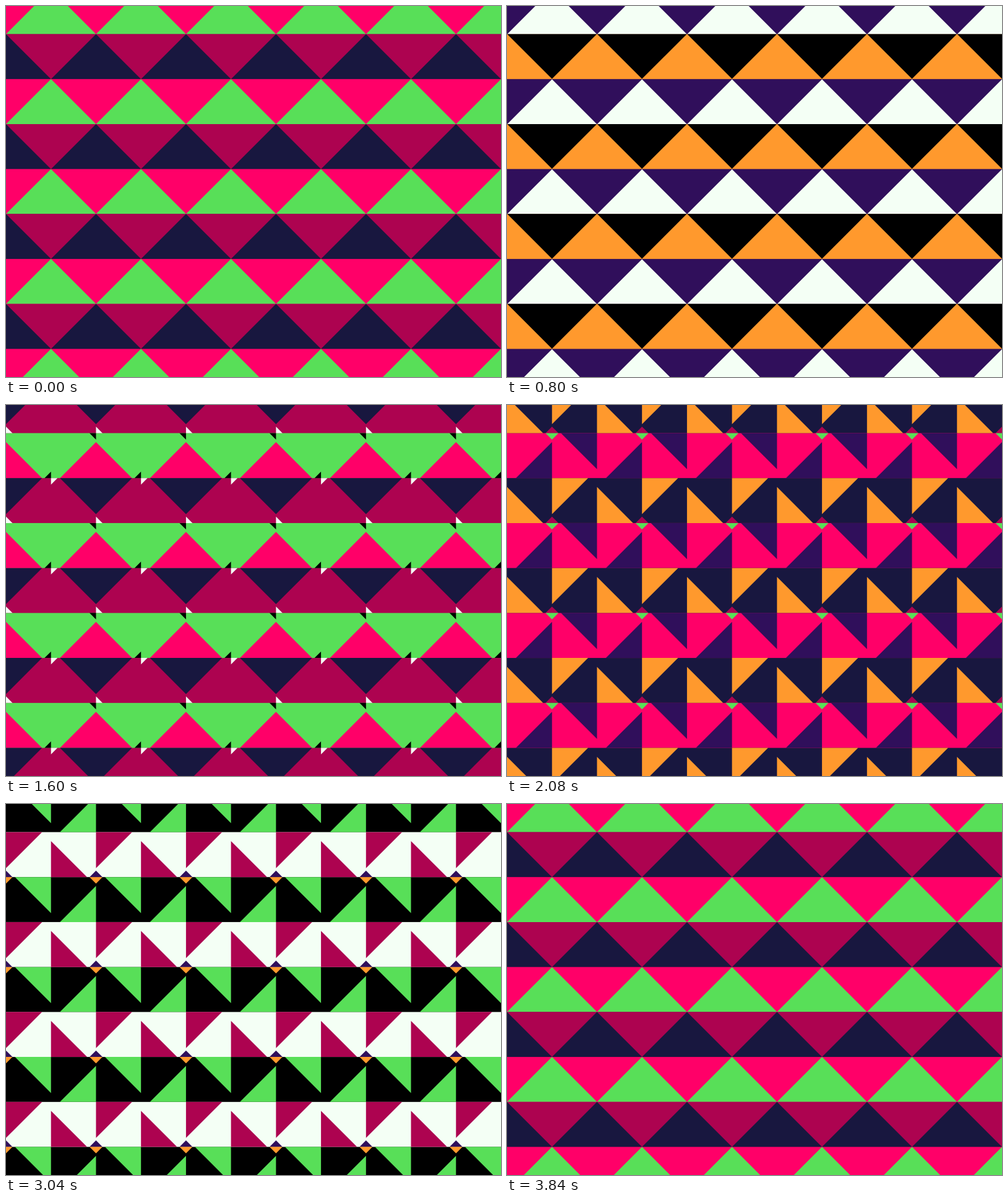
Animation of 800x600 px, one loop 3.88 s. Source, as an HTML page with a canvas:

```html
<!DOCTYPE html>
<html lang="en">
<head>
<meta charset="utf-8">
<title>Triangle pattern</title>
<style>
html, body { margin: 0; width: 100%; height: 100%; overflow: hidden; background: #000; }
canvas { display: block; }
</style>
</head>
<body>
<canvas id="stage" width="800" height="600"></canvas>
<script>
const ctx = document.getElementById('stage').getContext('2d');

const CELL = 800 / 11;
const TOP = -27.27;
const ROWS = 9, COLS = 11;
const FRAME = 40, FRAMES = 97, STEP = 12;

const COLORS = ['#300f5b', '#f4fff5', '#ad0350', '#18173f',
                '#ff992d', '#000000', '#58df58', '#ff0068'];

// Corners of a cell, counterclockwise from the lower left
const CORNERS = [[0, 1], [1, 1], [1, 0], [0, 0]];
// First corner for each cell of the repeating 2 x 2 block
const OFFSETS = [[0, 3], [1, 2]];

const mod = (a, n) => ((a % n) + n) % n;
// Part still to go in a cubic ease-out of the given duration
const remaining = (x, duration) => Math.max(0, 1 - x / duration) ** 3;

// Fills one right triangle per cell along a row
function triangles(row, turn, leg, color) {
  if (leg <= 0) return;
  ctx.beginPath();
  for (let col = 0; col < COLS; col++) {
    const [cx, cy] = CORNERS[mod(OFFSETS[row % 2][col % 2] + turn, 4)];
    const x = (col + cx) * CELL;
    const y = TOP + (row + cy) * CELL;
    const dx = leg * (1 - 2 * cx);
    const dy = leg * (1 - 2 * cy);
    ctx.moveTo(x, y);
    // Same winding for every corner
    if (dx * dy > 0) {
      ctx.lineTo(x + dx, y);
      ctx.lineTo(x, y + dy);
    } else {
      ctx.lineTo(x, y + dy);
      ctx.lineTo(x + dx, y);
    }
    ctx.closePath();
  }
  ctx.fillStyle = color;
  ctx.fill();
}

function draw(time) {
  const frame = Math.floor(time / FRAME) % FRAMES;
  const step = Math.floor(frame / STEP);
  const x = (frame % STEP) / STEP;
  const growing = CELL * (1 - remaining(x, 0.8));
  const shrinking = CELL * remaining(x, 0.7);
  const color = (row, n) => COLORS[mod(n + (row % 2) * 4, 8)];

  for (let row = 0; row < ROWS; row++) {
    ctx.fillStyle = color(row, step - 1);
    ctx.fillRect(0, TOP + row * CELL, 800, 700);
  }
  for (let row = 0; row < ROWS; row++) {
    triangles(row, step + 1, shrinking, color(row, step - 2));
    triangles(row, step, growing, color(row, step));
  }
}

const start = performance.now();
function loop() {
  draw(performance.now() - start);
  requestAnimationFrame(loop);
}
loop();
</script>
</body>
</html>
```
